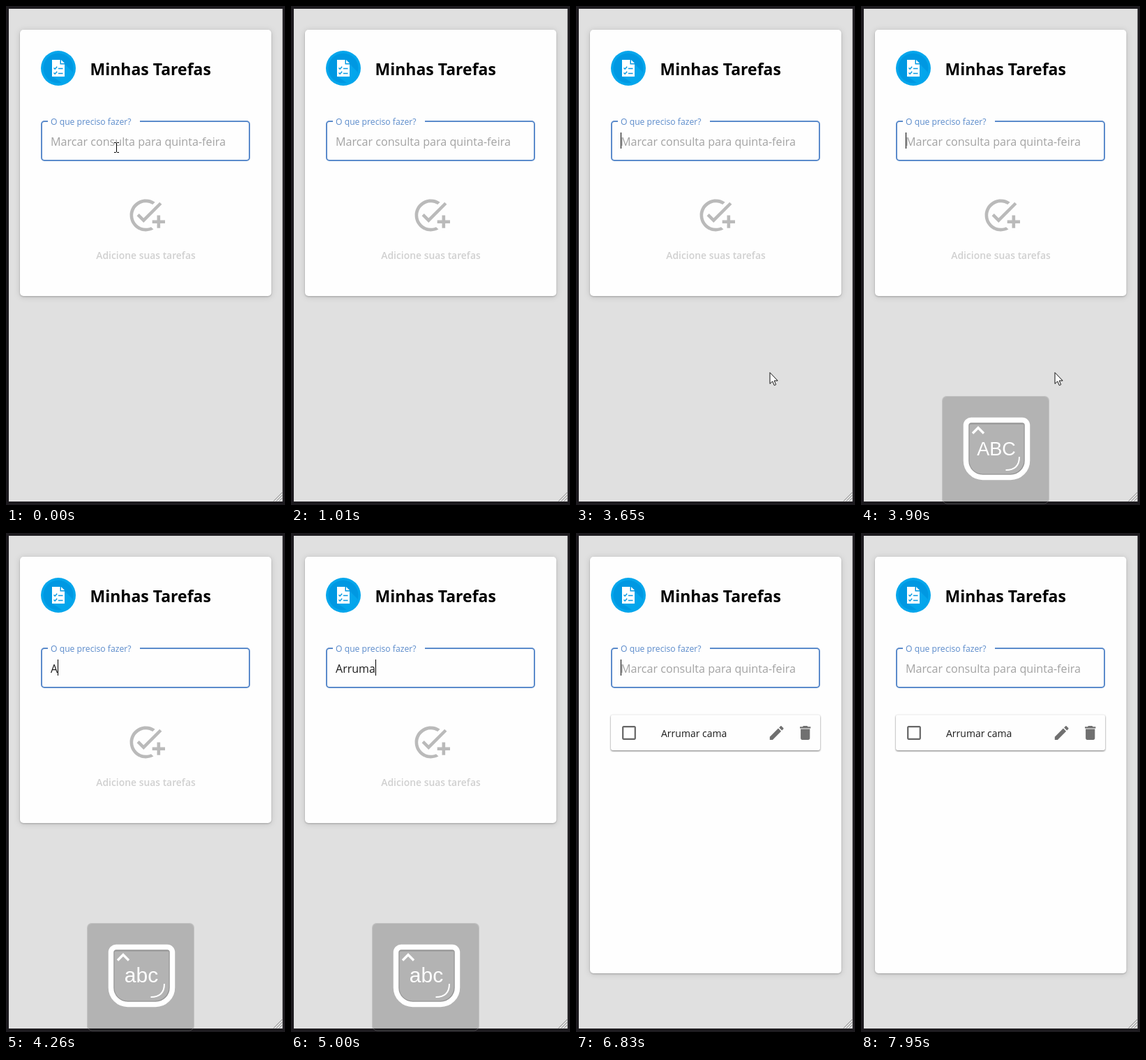
An HTML page that plays this animation: 400 px wide and 714 px high, repeating every 8 s.

```html
<!DOCTYPE html>
<html lang="pt">
<head>
<meta charset="utf-8">
<title>Minhas Tarefas</title>
<style>
html, body { margin: 0; width: 100%; height: 100%; overflow: hidden; background: #1d1b1f; }
svg { display: block; width: 100%; height: 100%; }
text { font-family: "Open Sans", "Noto Sans", sans-serif; white-space: pre; }
.key { font-family: "Liberation Sans", Arial, sans-serif; fill: #fff; text-anchor: middle; }
#card { filter: drop-shadow(0 1px 1px rgba(0,0,0,.22)) drop-shadow(0 1px 4px rgba(0,0,0,.14)); }
#row { filter: drop-shadow(0 1px 1px rgba(0,0,0,.55)); }
</style>
</head>
<body>
<svg viewBox="0 0 400 714">
  <rect width="400" height="714" fill="#1d1b1f"/>
  <rect x="4" y="4" width="392.5" height="705" fill="#e0e0e0"/>
  <path d="M383.5 708.5l13-13M387.5 708.5l9-9M391.5 708.5l5-5" stroke="#8c8c8c"/>

  <rect id="card" x="20" y="34" width="360.5" height="381" rx="5" fill="#fefefe"/>

  <circle cx="75" cy="89" r="25" fill="#04a6ec"/>
  <circle cx="75" cy="89" r="21.5" fill="#0098e2"/>
  <path d="M84 83l11.5 11.5A21.5 21.5 0 0 1 80 110L67 101z" fill="#04a6ec"/>
  <path d="M66 77h11.5v6.5H84V101H66z" fill="#fff"/>
  <path d="M79 77l5 5h-5z" fill="#fff"/>
  <path d="M68.5 88.5l1.7 1.7 3-3.4M68.5 95.5l1.7 1.7 3-3.4M75 89.5h6.5M75 96.5h6.5" fill="none" stroke="#0098e2" stroke-width="1.4"/>
  <text x="120.5" y="99" font-size="23" font-weight="700">Minhas Tarefas</text>

  <path d="M60 165H55a4 4 0 0 0-4 4V217a4 4 0 0 0 4 4H345a4 4 0 0 0 4-4V169a4 4 0 0 0-4-4H192" fill="none" stroke="#5b8bcb" stroke-width="2"/>
  <text x="64" y="170" font-size="12.2" fill="#5b8bcb">O que preciso fazer?</text>
  <text id="hint" x="64" y="200" font-size="16.15" fill="#a3a3a3">Marcar consulta para quinta-feira</text>
  <text id="typed" x="64" y="200" font-size="16" fill="#1c1c1c"></text>
  <rect id="caret" x="64" y="181" width="1" height="23"/>

  <g id="empty">
    <path transform="translate(173 272) scale(2.2917)" fill="#bababa" d="M22 5.18L10.59 16.6l-4.24-4.24 1.41-1.41 2.83 2.83 10-10zM12 20c-4.41 0-8-3.59-8-8s3.59-8 8-8c1.57 0 3.04.46 4.28 1.25l1.45-1.45C16.1 2.67 14.13 2 12 2 6.48 2 2 6.48 2 12s4.48 10 10 10c1.73 0 3.36-.44 4.78-1.22l-1.5-1.5c-1 .46-2.11.72-3.28.72zM19 15h-3v2h3v3h2v-3h3v-2h-3v-3h-2z"/>
    <text x="200.5" y="362" font-size="13.9" font-weight="600" fill="#d0d0d0" text-anchor="middle">Adicione suas tarefas</text>
  </g>

  <g id="list">
    <rect id="row" x="50" y="260" width="300" height="51" rx="3" fill="#fefefe"/>
    <path d="M52 260h296" stroke="#f1f1f1"/>
    <path transform="translate(62.8 272.8) scale(1.1)" fill="#666" d="M19 5v14H5V5h14m0-2H5c-1.1 0-2 .9-2 2v14c0 1.1.9 2 2 2h14c1.1 0 2-.9 2-2V5c0-1.1-.9-2-2-2z"/>
    <text x="122" y="291.5" font-size="14" fill="#1c1c1c">Arrumar cama</text>
    <path transform="translate(274.5 272.8) scale(1.1)" fill="#707070" d="M3 17.25V21h3.75L17.81 9.94l-3.75-3.75zM20.71 7.04c.39-.39.39-1.02 0-1.41l-2.34-2.34c-.39-.39-1.02-.39-1.41 0l-1.83 1.83 3.75 3.75z"/>
    <path transform="translate(315.5 272.8) scale(1.1)" fill="#707070" d="M6 19c0 1.1.9 2 2 2h8c1.1 0 2-.9 2-2V7H6zM19 4h-3.5l-1-1h-5l-1 1H5v2h14z"/>
  </g>

  <g id="caps">
    <rect x="116" y="558" width="154" height="154.5" rx="7" fill="#000" fill-opacity=".205"/>
    <rect x="116.5" y="558.5" width="153" height="153.5" rx="7" fill="none" stroke="#fff" stroke-opacity=".22"/>
    <g fill="none" stroke="#fff">
      <path d="M155 597H234Q235 597 235 600V650A21 21 0 0 1 214 671H174A20 20 0 0 1 154 651V600Q154 597 157 597z" stroke="#969696" stroke-width="3"/>
      <path d="M158.5 592.5H231A7.5 7.5 0 0 1 238.5 600V650.5A24 24 0 0 1 214.5 674.5H174.5A24 24 0 0 1 150.5 650.5V600A7.5 7.5 0 0 1 158.5 592.5z" stroke-width="7.5"/>
      <path d="M160 611.5l8-8 8 8" stroke-width="3.4"/>
      <path d="M207.5 664Q227 664 227 645" stroke-width="2"/>
    </g>
    <text id="abc" class="key" x="194" y="643"></text>
  </g>

  <path id="beam" d="M155 195.5h2.5l1 1 1-1h2.5M158.5 196v13M155 209.5h2.5l1-1 1 1h2.5" fill="none" stroke="#000"/>
  <path id="arrow" d="M.5.5V16.5l3.7-3.5 2.6 5.8 2.4-1.1-2.5-5.6H11.7z" fill="#fff" stroke="#111"/>
</svg>
<script>
const LOOP = 8000;
const el = id => document.getElementById(id);
const [card, hint, typed, caret, empty, list, caps, abc, beam, arrow] =
  ['card', 'hint', 'typed', 'caret', 'empty', 'list', 'caps', 'abc', 'beam', 'arrow'].map(el);

const blinks = [[0, 0], [510, 1], [1010, 0], [1540, 1], [2150, 0], [2650, 1], [3150, 0],
  [3650, 1], [6340, 0], [6830, 1], [6950, 0], [7450, 1], [7950, 0]];
// number of characters in the field
const keys = [[0, 0], [4020, 1], [4510, 2], [4630, 3], [4750, 4], [5000, 6], [5250, 7],
  [5740, 9], [5860, 10], [5980, 12], [6830, 0]];
const moves = [[0, null], [1540, [372, 684]], [1660, null], [1910, [307, 613]],
  [2030, [286, 551]], [2150, [277.5, 524]], [4020, null]];

const at = (track, t) => track.findLast(([start]) => start <= t)[1];
const show = (node, on) => node.setAttribute('visibility', on ? 'visible' : 'hidden');

function capsOpacity(t) {
  if (t < 3900 || t >= 6830) return 0;
  if (t < 5740) return 1;
  const step = Math.min(6, Math.floor((t - 5740) / 120) + 1);
  return 1 - 0.147 * step;
}

function draw(t) {
  const count = at(keys, t), done = t >= 6830, pos = at(moves, t);
  typed.textContent = 'Arrumar cama'.slice(0, count);
  show(hint, !count);
  caret.setAttribute('x', 64 + (count ? Math.round(typed.getComputedTextLength()) : 0));
  show(caret, at(blinks, t));

  card.setAttribute('height', done ? 596 : 381);
  show(empty, !done);
  show(list, done);

  const upper = t < 4260;
  caps.setAttribute('opacity', capsOpacity(t));
  abc.textContent = upper ? 'ABC' : 'abc';
  abc.setAttribute('font-size', upper ? 27 : 30);

  show(beam, t < 1010);
  show(arrow, pos);
  if (pos) arrow.setAttribute('transform', `translate(${pos})`);
}

const begin = performance.now();
function tick() {
  draw((performance.now() - begin) % LOOP);
  requestAnimationFrame(tick);
}
tick();
</script>
</body>
</html>
```
